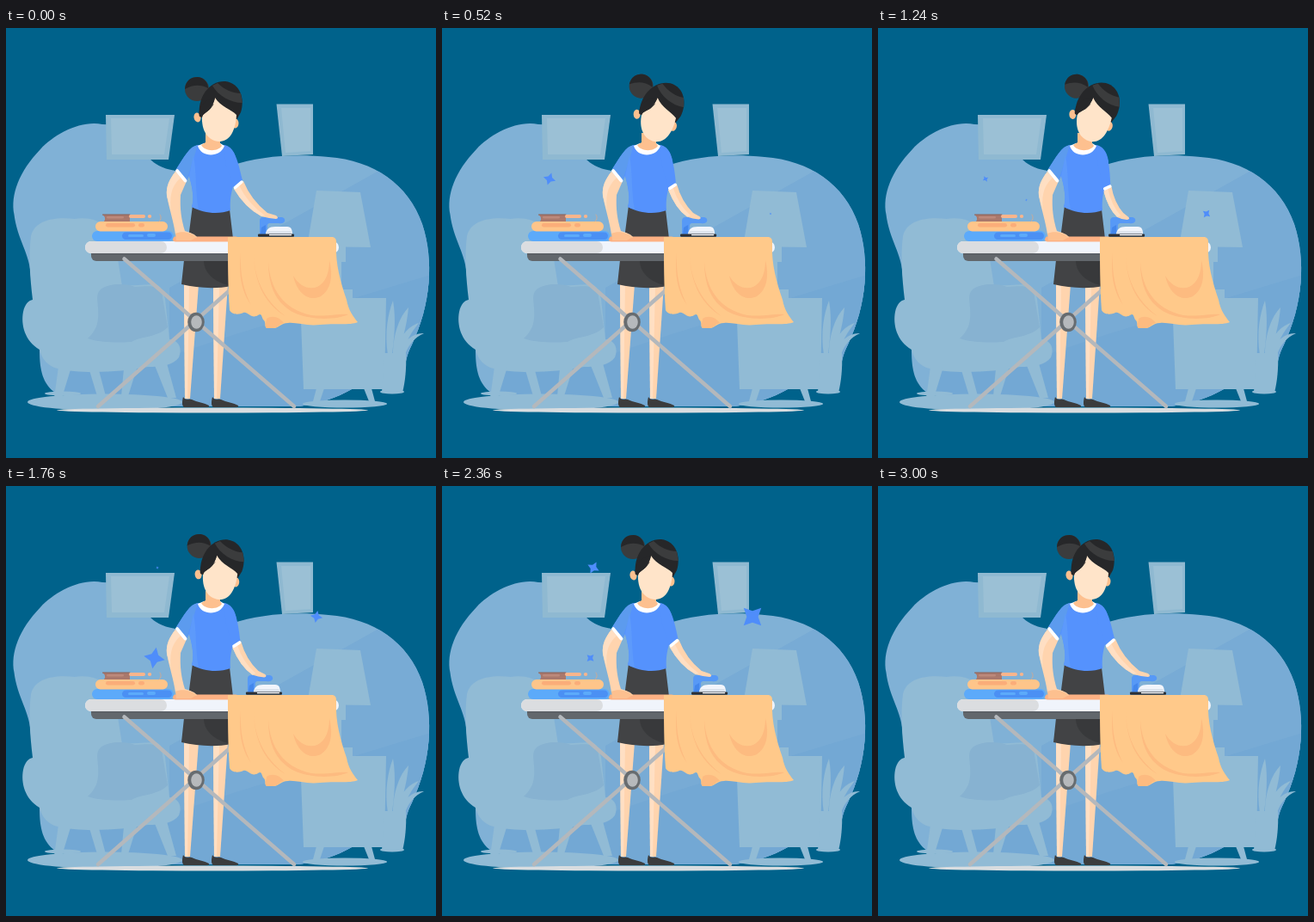
These frames come from a looping animation (500x500 px, 3040 ms). An HTML page with a canvas:

```html
<!DOCTYPE html>
<html lang="en">
<head>
<meta charset="utf-8">
<title>Ironing</title>
<style>
html, body { margin: 0; width: 100%; height: 100%; overflow: hidden; background: #00628b; }
canvas { display: block; width: 500px; height: 500px; }
</style>
</head>
<body>
<canvas id="stage" width="500" height="500"></canvas>
<script>
const canvas = document.getElementById('stage');
const ratio = window.devicePixelRatio || 1;
canvas.width = canvas.height = Math.round(500 * ratio);
const ctx = canvas.getContext('2d');

const LOOP = 3040;
const SKIN = '#ffd4ae', SKIN_LIGHT = '#ffdfc3', SKIN_DARK = '#fdc08f', FACE = '#ffe4c9';
const BLUE = '#5592fd', HAIR = '#3b3c3d', HAIR_DARK = '#262729';
const WALL = '#91bbd5', WALL_DARK = '#87b2d1';

const IRON = [[0, 0], [520, .6], [880, .97], [1020, 1], [1240, .94], [1760, .53], [2360, .11], [2800, 0], [LOOP, 0]];
const HEAD = [[0, 0], [520, .75], [840, 1], [1240, .7], [1760, .21], [2280, 0], [LOOP, 0]];

// x, y, radius, birth, peak, end, starting angle
const STARS = [
  [125, 175.5, 10.5, 200, 700, 1600, 0],
  [382, 216, 6.5, 300, 1060, 1680, -.28],
  [172.5, 200, 12.5, 1080, 1800, 2840, -.5],
  [176, 95, 7.5, 1480, 2360, 2880, -.38],
  [361, 152, 14.5, 1120, 2400, 2880, -.45]
];

const lerp = (a, b, p) => a + (b - a) * p;
const smooth = p => (1 - Math.cos(Math.PI * Math.max(0, Math.min(1, p)))) / 2;

// Smooth curve through keys, flat at every extreme.
function track(keys, t) {
  const slope = i => {
    const a = keys[i - 1], b = keys[i], c = keys[i + 1];
    if (!a || !c) return 0;
    const l = (b[1] - a[1]) / (b[0] - a[0]), r = (c[1] - b[1]) / (c[0] - b[0]);
    return l * r <= 0 ? 0 : 2 * l * r / (l + r);
  };
  let i = 0;
  while (i < keys.length - 2 && t > keys[i + 1][0]) i++;
  const [x0, y0] = keys[i], [x1, y1] = keys[i + 1];
  const d = x1 - x0, u = (t - x0) / d, v = 1 - u;
  return y0 * v * v * (1 + 2 * u) + y1 * u * u * (3 - 2 * u)
    + slope(i) * d * u * v * v - slope(i + 1) * d * u * u * v;
}

function fill(path, color) {
  ctx.fillStyle = color;
  ctx.fill(new Path2D(path));
}

function stroke(path, color, width) {
  ctx.strokeStyle = color;
  ctx.lineWidth = width;
  ctx.lineCap = 'round';
  ctx.stroke(new Path2D(path));
}

function oval(x, y, rx, ry, color, angle = 0) {
  ctx.fillStyle = color;
  ctx.beginPath();
  ctx.ellipse(x, y, rx, ry, angle, 0, Math.PI * 2);
  ctx.fill();
}

function pill(x0, y0, x1, y1, color, r = (y1 - y0) / 2) {
  ctx.fillStyle = color;
  ctx.beginPath();
  ctx.roundRect(x0, y0, x1 - x0, y1 - y0, r);
  ctx.fill();
}

function drawRoom() {
  ctx.fillStyle = '#00628b';
  ctx.fillRect(0, 0, 500, 500);

  const blob = 'M112 112C86 107 56 124 40 141C15 167 5 194 9.500 217C13 246 28 262 29 290L39 375C39 398 43 414 57 424L110 440H340C362 437 385 430 402 420L440 412L464 400C464 390 465 382 472 368C494 322 498 270 484 228C468 182 428 154 375 150C335 146 295 149 262 160C235 168 215 170 197 166C180 163 173 158 166 151C158 130 146 113 112 112Z';
  ctx.save();
  ctx.clip(new Path2D(blob));
  fill('M0 90H500V450H0Z', '#80b1d6');
  fill('M435 165L500 130V450H190V302Z', '#78abd5');
  fill('M500 285L270 355L180 385L60 400V450H500Z', '#73a8d4');
  ctx.restore();

  fill('M116 101H196L189 153H117Z', '#8fb9d1');
  fill('M122 105H190L184 147H123Z', '#9bc0d5');
  fill('M314.500 88.500H357V147L321 149Z', '#8fb9d1');
  fill('M320 93H354V143L325 145Z', '#9bc0d5');

  oval(115, 435, 90, 9.500, WALL);
  oval(66, 425, 21, 2.500, WALL);
  oval(394, 437, 49, 4.500, WALL);
  oval(449, 423, 14, 2.500, WALL);

  // armchair
  fill('M29 242C33 224 55 219 80 222C105 218 126 232 127 250L135 300L172 298C180 299 183 305 185 315L190 362C202 363 205 374 201 383C195 392 180 394 165 394C130 401 85 402 60 396C48 393 42 385 39 374C22 364 17 345 20 330C22 321 26 317 31 316C28 290 26 266 29 242Z', WALL);
  fill('M110 304C120 296 140 297 150 301C165 300 177 299 181 307L188 348C176 360 158 358 146 365C128 366 110 366 95 361C107 350 108 340 107 325C106 314 105 309 110 304Z', WALL_DARK);
  fill('M61 394H76L65 430H56ZM97 398H108L116 428H106ZM137 396H152L142 428H134ZM172 390H187L198 430H188Z', WALL);

  // lamp and cabinet
  fill('M361 189L412 191L424 255L350 254Z', WALL);
  fill('M384 254H395V272H390V304H403V314H370V304H384Z', WALL);
  fill('M342 314H442L440 420H346Z', WALL);
  fill('M361 419H370L365 434H357ZM416 419H425L429 434H422Z', WALL);

  // plant
  fill('M440 378H465C466 395 464 412 461 424H437Z', WALL);
  fill('M444 380C440 355 444 332 450 317C454 340 451 362 449 380ZM450 380C450 355 458 335 468 325C466 348 460 365 456 380ZM454 380C456 360 467 347 480 343C471 354 465 365 460 380ZM456 380C462 363 474 354 486 355C475 360 468 368 464 380Z', WALL);

  oval(240, 444.500, 181, 3, '#d9dde0');
}

function drawLowerBody() {
  fill('M207 298H224L214 431H208Z', SKIN);
  fill('M207 298H213L211 431H208Z', SKIN_LIGHT);
  fill('M241 298H258L249 431H242Z', SKIN);
  fill('M241 298H248L245 431H242Z', SKIN_LIGHT);
  const shoe = 'M206 429C209 434 213 430 216 432C222 435 231 436 236 439C237 441 234 441 231 441H207C204 439 205 433 206 429Z';
  fill(shoe, HAIR);
  ctx.save();
  ctx.translate(34, 0);
  fill(shoe, HAIR);
  ctx.restore();
  fill('M217 206C229 212 247 214 260 211L264 245L262 300C242 304 222 302 204 298L207 270L212 245Z', '#424345');
  fill('M231 243H264L262 300C247 297 230 288 230 270Z', '#38393b');
}

function drawBoard() {
  pill(99, 258, 270, 271, '#62676c', 6);
  fill('M99 260H270V264H99Z', '#5c6167');
  stroke('M107 440L300 270', '#b4b8bc', 4.500);
  stroke('M137.500 268.500L335 440', '#b4b8bc', 4.500);
  oval(221, 342, 9.800, 11.300, '#676c70');
  oval(221.500, 342, 6.300, 7.700, '#b6b9bc');
  pill(92, 248, 387, 262, '#f0f4fb');
  pill(92, 248, 187, 262, '#dbdde0');
  pill(194, 242.500, 270, 248.500, '#fdb183', 3);
}

function drawStack() {
  pill(100, 236, 195, 248, '#5caafa');
  pill(135, 237.500, 193, 246, '#4b90f4');
  pill(142, 240, 160, 243, '#5caafa');
  pill(164, 239, 174, 243, '#5caafa');
  pill(104, 225, 188, 236.500, '#fec58a');
  pill(116, 227, 150, 231.500, '#fbad79');
  pill(154, 227, 161, 231.500, '#fbad79');
  fill('M112 217H144V225H114Q117 220 112 217Z', '#a9786c');
  stroke('M112.500 217H144', '#8b6259', 1.200);
  pill(117, 219, 137, 221.500, '#bd897a');
  pill(143, 217, 162, 221, '#f9b58c');
  oval(167, 219, 2.200, 2, '#f9b58c');
  stroke('M178 225Q182 221 179 217', '#d8a98c', .8);
}

function drawCloth() {
  fill('M258 243H380Q385 244 384 252C383 275 389 295 396 316C398 328 404 336 409 342C400 346 382 343 365 345C350 347 338 342 328 343C319 343 318 349 311 349H303C300 347 303 342 299 339C297 335 297 331 293 334C285 339 281 329 276 331C270 334 262 333 260 328C258 300 258 270 258 243Z', '#ffc98a');
  const fold = '#fdbb80';
  fill('M376 270C381 290 377 305 366 312C352 319 338 308 334 288C341 300 352 305 362 301C372 296 376 284 376 270Z', fold);
  fill('M305 272C307 303 322 327 355 334C372 336 389 332 398 333C383 340 352 340 333 330C312 318 305 297 305 272Z', fold);
  fill('M288 260C288 288 298 315 325 335C302 322 288 296 288 260Z', fold);
  fill('M273 262C272 290 277 306 285 322C275 308 270 290 273 262Z', fold);
  fill('M303 338C310 333 319 337 323 343C317 344 317 349 310 349H303C300 346 303 342 303 338Z', fold);
}

function drawIron(dx) {
  ctx.save();
  ctx.translate(dx, 0);
  fill('M295 240V224Q295 220 299 220H321Q325 221 324 225Q322 228 317 227H306Q303 228 304 232L302 240Z', '#5799f6');
  fill('M297 232L302 229V239H296Z', '#4387ec');
  fill('M302 241C302 234 306 231 313 231H327C332 231 333 235 333 241Z', '#f2f5fb');
  fill('M302 240Q302 236 306 236H331L333 240Z', '#dde4ed');
  pill(293, 239.500, 335, 242.700, '#2d3035', 1);
  fill('M306 240H332V241.300H306Z', '#f5f7fa');
  ctx.restore();
}

function drawTorso(p) {
  // left arm
  fill('M197 167C190 176 186 184 187 195C190 211 195 225 197 240C205 247 215 245 222 243.500C221 240 214 238 208 236C204 223 202 211 203 194L210 178Z', SKIN);
  fill('M197 167C190 176 186 184 187 195L192 214C190 198 191 185 203 174Z', SKIN_LIGHT);
  fill('M197 239C205 235 215 238 222 243L215 247H198Z', SKIN_DARK);

  // right arm
  const at = (x0, y0, x1, y1) => lerp(x0, x1, p) + ' ' + lerp(y0, y1, p);
  const low = at(265, 187, 262, 189);
  fill(`M${at(276, 178, 271, 184)}Q${at(285, 200, 274, 203)} ${at(304, 215, 284, 215)}L${at(314, 218, 290, 220)}
    Q${at(318, 221, 292, 222)} ${at(314, 222, 288, 223)}L${at(306, 221, 282, 222)}L${at(297, 219, 277, 220)}
    Q${at(278, 209, 267, 210)} ${low}Z`, SKIN);
  fill(`M${at(271, 183, 267, 187)}Q${at(281, 204, 271, 207)} ${at(301, 218, 281, 218)}
    L${at(297, 219, 277, 220)}Q${at(278, 209, 267, 210)} ${low}Z`, SKIN_LIGHT);

  // shirt
  fill('M223 136C213 138 208 149 198 164L210 178L213 172C217 186 219 199 216 208C230 216 248 217 261 212C260 199 262 190 266 178L268 155C266 143 261 137 253 136Z', BLUE);
  fill(`M253 136C266 139 269 152 ${at(275, 177, 270, 183)}L${at(265, 186, 262, 188)}L256 160Z`, BLUE);
  fill('M223 136C213 138 208 149 198 164L210 178L215 162C218 154 220 145 223 136Z', '#5c9bee');
  fill('M218 148C222 170 220 192 224 211L216 208C219 199 217 186 213 172Z', '#5d9afb');
  stroke('M199 166L208.500 177.500', '#fff', 3.800);
  stroke(`M${at(274, 179, 269.500, 184.500)}L${at(266.500, 185.500, 263.500, 187)}`, '#fff', 3.500);

  // neck and collar
  fill('M223 137C227 151 249 151 254 137L249 134H230Z', '#fff');
  fill('M232 122H249V134L251 137C247 144 231 144 227 136L232 133Z', SKIN_DARK);
}

function drawHead(p) {
  const px = 247, py = 127;
  ctx.save();
  ctx.translate(px, py);
  ctx.rotate(p * .222);
  ctx.translate(-px, -py);
  oval(222, 71, 14, 14, HAIR);
  fill('M208 71C209 61 215 57 223 57C231 58 235 64 235 70C226 65 217 66 208 71Z', HAIR_DARK);
  fill('M225 103C222 80 237 61 255 62C272 64 278 82 273 98L268 107L235 105Z', HAIR_DARK);
  fill('M240 67L246 64C254 72 264 76 273 76L275 87C261 87 247 79 240 67Z', HAIR);
  oval(222.500, 104, 4, 5.500, SKIN_DARK, -.2);
  oval(266.500, 111, 4, 5.500, SKIN_DARK, .1);
  fill('M243 81C250 92 261 94 268 101C267 118 261 132 248 132C235 131 227 120 228 102C235 97 241 91 243 81Z', FACE);
  fill('M243 81C241 91 236 97 230 99L228 104L225 103C223 98 226 90 234 84Z', HAIR_DARK);
  stroke('M241 89Q237 96 232 98', HAIR_DARK, .8);
  ctx.restore();
}

function drawStar([x, y, radius, birth, peak, end, angle], t) {
  if (t <= birth || t >= end) return;
  const size = t < peak ? smooth((t - birth) / (peak - birth)) : smooth((end - t) / (end - peak));
  const r = radius * size;
  ctx.save();
  ctx.translate(x, y);
  ctx.rotate(angle + (t - birth) * .001);
  ctx.fillStyle = '#4f8dfa';
  ctx.beginPath();
  for (let i = 0; i < 8; i++) {
    const d = i % 2 ? r * .46 : r, a = i * Math.PI / 4;
    ctx.lineTo(Math.cos(a) * d, Math.sin(a) * d);
  }
  ctx.fill();
  ctx.restore();
}

function draw(now) {
  const t = Math.floor(now % LOOP / 40) * 40;
  const push = track(IRON, t);
  ctx.setTransform(ratio, 0, 0, ratio, 0, 0);
  drawRoom();
  STARS.forEach(star => drawStar(star, t));
  drawLowerBody();
  drawBoard();
  drawStack();
  drawCloth();
  drawIron(-26.5 * push);
  drawTorso(push);
  drawHead(track(HEAD, t));
}

let start;
function tick(now) {
  start ??= now;
  draw(now - start);
  requestAnimationFrame(tick);
}
draw(0);
requestAnimationFrame(tick);
</script>
</body>
</html>
```
